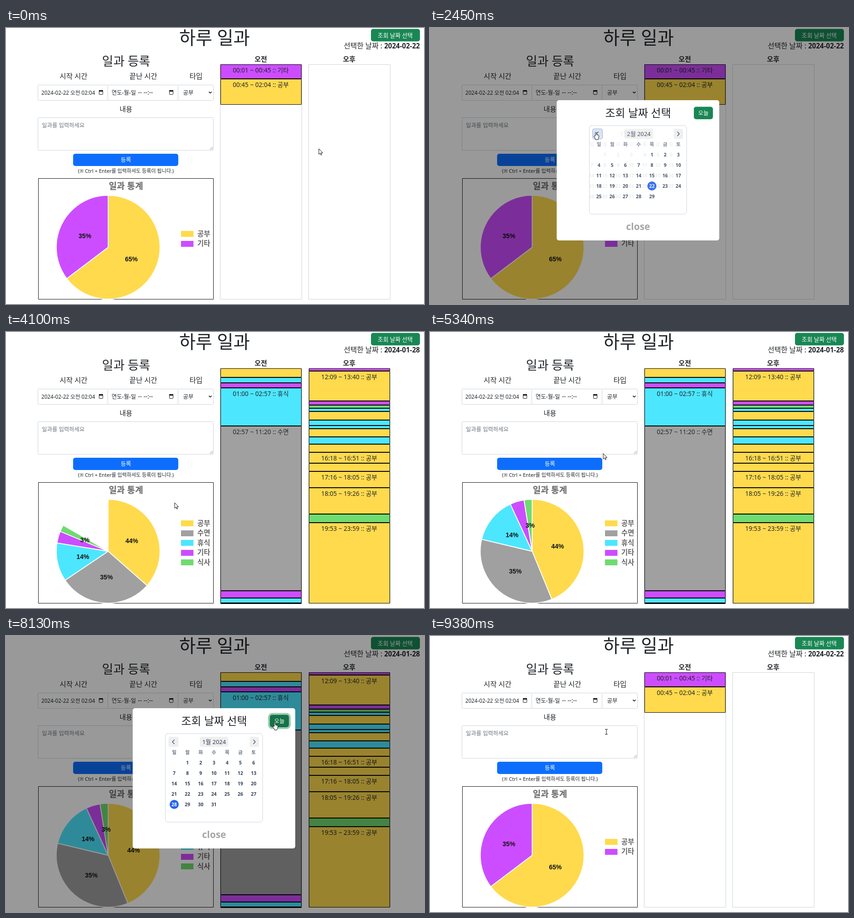
An HTML page with a canvas that plays this animation: 922x608 px, repeating every 9.45 s.

```html
<!DOCTYPE html>
<html lang="ko">
<meta charset="utf-8">
<title>하루 일과</title>
<style>
  html, body { margin: 0; width: 100%; height: 100%; overflow: hidden; background: #fff; }
  canvas { display: block; }
</style>
<canvas id="stage" width="922" height="608"></canvas>
<script>
const ctx = document.getElementById('stage').getContext('2d');
const LOOP = 9450;
const FONT = '"Noto Sans", "Noto Sans CJK KR", "Noto Sans CJK", sans-serif';
const COLOR = { 공부: '#ffda4d', 수면: '#a0a0a0', 휴식: '#4de6ff', 기타: '#cc4dff', 식사: '#70db70' };
const GREEN = '#198754', GREEN_HOVER = '#157347', LINE = '#ced4da';

// Moments of the story, in ms
const OPEN_1 = 1200, SLIDE = 2436, PICK = 3400, CLOSE_1 = 3540, LOAD_1 = 3740;
const OPEN_2 = 6735, PRESS_TODAY = 7840, CLOSE_2 = 8190, LOAD_2 = 8389;

// Pie slices: type, share, label. Blocks: bottom edge, type, time span.
const FEB = {
  pie: [['공부', .647, '65%'], ['기타', .353, '35%']],
  am: [[112, '기타', '00:01 ~ 00:45'], [169, '공부', '00:45 ~ 02:04']],
  pm: []
};
const JAN = {
  pie: [['공부', .438, '44%'], ['수면', .349, '35%'], ['휴식', .144, '14%'], ['기타', .044, ''], ['식사', .025, '3%']],
  am: [[100, '공부'], [112, '휴식'], [123, '기타'], [207, '휴식', '01:00 ~ 02:57'],
    [570, '수면', '02:57 ~ 11:20'], [586, '기타'], [597, '휴식'], [599, '수면']],
  pm: [[86, '기타'], [152, '공부', '12:09 ~ 13:40'], [161, '기타'], [168, '식사'], [175, '휴식'],
    [194, '공부'], [206, '휴식'], [213, '휴식'], [231, '공부'], [247, '휴식'], [265, '공부'],
    [289, '공부', '16:18 ~ 16:51'], [307, '공부'], [343, '공부', '17:16 ~ 18:05'],
    [401, '공부', '18:05 ~ 19:26'], [420, '식사'], [598, '공부', '19:53 ~ 23:59']]
};

// Pointer way points: time, x, y
const PATH = [
  [0, 690, 266], [900, 858, 14], [1300, 858, 14], [1960, 362, 212], [2280, 366, 230], [2500, 366, 230],
  [2850, 303, 300], [3150, 350, 375], [3260, 370, 383], [3400, 372, 376], [5060, 372, 376],
  [5340, 382, 268], [5680, 600, 135], [6020, 828, 24], [6400, 857, 16], [6650, 855, 17], [6940, 855, 17],
  [7700, 594, 192], [8200, 593, 191], [8400, 593, 191], [9310, 389, 211], [LOOP, 389, 211]
];

const ARROW = new Path2D('M0 0V12.3L2.8 9.7 4.7 14 6.5 13.2 4.7 9.1H8.6Z');
const HAND = new Path2D('M-1.3 8V1.2a1.3 1.3 0 0 1 2.6 0V5l4 1q1.6.5 1.4 2.3l-.8 4q-.2 1.3-1 2.2V16H-1v-1.5L-4.3 9.3q-.6-1.6 1-1.5z');
const IBEAM = new Path2D('M-3-5.5H-1L0-5 1-5.5H3M0-5V5M-3 5.5H-1L0 5 1 5.5H3');

const clamp = v => Math.max(0, Math.min(1, v));
const ramp = (t, start, length) => clamp((t - start) / length);
const between = (t, a, b) => t >= a && t < b;
const within = (x, y, l, t, r, b) => x >= l && x <= r && y >= t && y <= b;

// y is the visual middle of the line
function text(str, x, y, size, { color = '#212529', weight = 400, align = 'center', font = FONT } = {}) {
  ctx.font = `${weight} ${size}px ${font}`;
  ctx.fillStyle = color;
  ctx.textAlign = align;
  ctx.fillText(str, x, y + size * .37);
}

function box(l, t, r, b, { fill, stroke, radius = 0, width = 1 }) {
  ctx.beginPath();
  ctx.roundRect(l, t, r - l, b - t, radius);
  if (fill) { ctx.fillStyle = fill; ctx.fill(); }
  if (stroke) { ctx.strokeStyle = stroke; ctx.lineWidth = width; ctx.stroke(); }
}

function line(points, color, width) {
  ctx.beginPath();
  points.forEach(p => ctx.lineTo(...p));
  ctx.strokeStyle = color;
  ctx.lineWidth = width;
  ctx.stroke();
}

function dateIcon(x, y) {
  box(x - 4, y - 3.5, x + 4, y + 4.5, { stroke: '#111', radius: 1 });
  ctx.fillStyle = '#111';
  ctx.fillRect(x - 4.5, y - 5, 9, 3);
}

function form() {
  text('일과 등록', 265, 73, 27);
  text('시작 시간', 149, 106, 15.6);
  text('끝난 시간', 303, 106, 15.6);
  text('타입', 419, 106, 15.6);
  text('내용', 264.5, 178, 15.2);
  for (const [l, r] of [[70.5, 224.5], [224.5, 379.5], [379.5, 457.5]])
    box(l, 125.5, r, 159.5, { stroke: LINE, radius: 2 });
  const left = { align: 'left' };
  text('2024-02-22 오전 02:04', 78, 142.5, 11.7, left);
  text('연도-월-일', 233, 142.5, 12.4, left);
  text('-- --:--', 291, 142.5, 13.5, left);
  text('공부', 390.5, 142.5, 12.5, left);
  dateIcon(209.5, 142);
  dateIcon(364.5, 142);
  line([[447.5, 140.5], [450.5, 143.5], [453.5, 140.5]], '#111', 1.7);
  box(70.5, 197.5, 457.5, 269.5, { stroke: LINE, radius: 2 });
  text('일과를 입력하세요', 79, 214.5, 12.4, { align: 'left', color: '#6c757d' });
  line([[450, 268], [456, 262]], '#777', 1);
  line([[454, 268], [456, 266]], '#777', 1);
  box(148, 277, 380, 304, { fill: '#0d6efd', radius: 5 });
  text('등록', 264.5, 290, 12.5, { color: '#fff' });
  text('(※ Ctrl + Enter를 입력하셔도 등록이 됩니다.)', 264.5, 315, 11.1);
}

function chart(slices, grow) {
  const cx = 225.3, cy = 483, radius = 114.4;
  box(71.5, 331.5, 457.5, 597.5, { stroke: '#111' });
  text('일과 통계', 264.5, 348, 19.2, { weight: 700, color: '#666' });
  let from = -Math.PI / 2;
  const labels = [];
  slices.forEach(([type, share, label], i) => {
    const to = from + share * grow * Math.PI * 2, mid = (from + to) / 2;
    ctx.beginPath();
    ctx.moveTo(cx, cy);
    ctx.arc(cx, cy, radius, from, to);
    ctx.closePath();
    ctx.fillStyle = COLOR[type];
    ctx.fill();
    ctx.strokeStyle = '#fff';
    ctx.lineWidth = 1.8;
    ctx.lineJoin = 'bevel';
    ctx.stroke();
    labels.push([label, cx + Math.cos(mid) * radius / 2, cy + Math.sin(mid) * radius / 2]);
    from = to;
    const y = 464.5 + (i - (slices.length - 1) / 2) * 21.5, top = Math.round(y - 6.5);
    box(386, top, 413.5, top + 13, { fill: COLOR[type] });
    text(type, 422, y - .5, 15.4, { weight: 700, color: '#666', align: 'left' });
  });
  for (const [label, x, y] of labels)
    text(label, x, y, 14, { weight: 700, color: '#111', font: '"Liberation Sans", sans-serif' });
}

function column(l, title, blocks) {
  const mid = l + 88.5;
  text(title, mid, 68, 15, { weight: 700 });
  box(l - 1, 80.5, l + 179, 597.5, { stroke: LINE });
  let top = 80.5;
  for (const [bottom, type, span] of blocks) {
    box(l, top, l + 178, bottom - .5, { fill: COLOR[type], stroke: '#000' });
    if (span) text(`${span} :: ${type}`, mid, top + 12.5, 13.6);
    top = bottom + .5;
  }
}

function header(date, hover) {
  text('하루 일과', 460, 21.5, 39.6, { weight: 350 });
  box(805, 2, 913, 29.5, { fill: hover ? GREEN_HOVER : GREEN, radius: 5 });
  text('조회 날짜 선택', 858.5, 16, 12.8, { color: '#fff' });
  text(date, 913, 39, 15.1, { weight: 600, align: 'right' });
  text('선택한 날짜 :', 830, 39, 15.8, { align: 'right' });
}

function month(name, firstDay, days, selected, dx, alpha) {
  if (alpha <= 0) return;
  ctx.save();
  ctx.globalAlpha = alpha;
  ctx.translate(dx, 0);
  box(427.5, 222, 490.5, 244, { fill: '#efefef', radius: 4 });
  text(name, 459, 233.5, 12.9, { color: '#334155', weight: 500 });
  [...'일월화수목금토'].forEach((d, c) =>
    text(d, 371 + c * 29.2, 256, 10.6, { color: '#64748b', weight: 600 }));
  for (let d = 1; d <= days; d++) {
    const cell = firstDay + d - 1;
    const x = 371 + cell % 7 * 29.2, y = 279 + Math.floor(cell / 7) * 23;
    if (d === selected) box(x - 10, y - 10, x + 10, y + 10, { fill: '#2563eb', radius: 10 });
    text(d, x, y, 10.4, { weight: d === selected ? 700 : 600, color: d === selected ? '#fff' : '#334155' });
  }
  ctx.restore();
}

function modal(t, hoverPrev, hoverToday) {
  box(0, 0, 922, 608, { fill: 'rgba(0,0,0,.4)' });
  box(279.5, 159, 638, 468, { fill: '#fff', radius: 5 });
  text('조회 날짜 선택', 459, 187.5, 24);
  const ring = ramp(t, PRESS_TODAY, 150) * .5;
  if (ring) box(580, 171.5, 626, 203, { stroke: `rgba(60,153,110,${ring})`, radius: 7, width: 4 });
  box(582, 173.5, 624, 201, { fill: hoverToday ? GREEN_HOVER : GREEN, radius: 5 });
  text('오늘', 603, 187.5, 12.5, { color: '#fff' });
  text('close', 459, 437.5, 21, { weight: 700, color: '#a6a6a6' });
  box(351.5, 215, 566, 410, { fill: '#fff', stroke: '#cbd5e1', radius: 6 });

  ctx.save();
  ctx.beginPath();
  ctx.rect(352, 215, 214, 195);
  ctx.clip();
  const focus = between(t, SLIDE - 60, CLOSE_1);
  const slide = ramp(t, SLIDE, 150);
  month('2월 2024', 4, 29, 22, 16 * slide, 1 - slide);
  month('1월 2024', 1, 31, t > PICK ? 28 : 0, -16 * (1 - slide), slide);
  box(358.5, 222, 380.5, 244.5, { fill: hoverPrev ? '#dde3ee' : '#efefef', stroke: focus && '#8fb4f5', radius: 4 });
  box(537.5, 222, 558, 244.5, { fill: '#efefef', radius: 4 });
  line([[371.5, 228.5], [367, 233.2], [371.5, 238]], '#475569', 1.5);
  line([[545.5, 228.5], [550, 233.2], [545.5, 238]], '#475569', 1.5);
  ctx.restore();
}

// Smooth curve through the way points that never overshoots
function pointerAt(t) {
  const i = PATH.findIndex(p => p[0] > t);
  const [t0] = PATH[i - 1], span = PATH[i][0] - t0, k = (t - t0) / span;
  const slope = (j, axis) => j < 1 || j >= PATH.length ? 0 :
    (PATH[j][axis] - PATH[j - 1][axis]) / (PATH[j][0] - PATH[j - 1][0]);
  const speed = (j, axis) => {
    const a = slope(j, axis), b = slope(j + 1, axis);
    return a * b > 0 ? 2 * a * b / (a + b) : 0;
  };
  return [1, 2].map(axis => {
    const from = PATH[i - 1][axis], to = PATH[i][axis];
    return from + (to - from) * k * k * (3 - 2 * k) +
      span * k * (1 - k) * ((1 - k) * speed(i - 1, axis) - k * speed(i, axis));
  });
}

function pointer(x, y, hand, beam) {
  const shape = hand ? HAND : beam ? IBEAM : ARROW;
  ctx.save();
  ctx.translate(x, y);
  ctx.strokeStyle = '#111';
  ctx.lineWidth = 1;
  ctx.fillStyle = '#fff';
  if (shape !== IBEAM) ctx.fill(shape);
  ctx.stroke(shape);
  ctx.restore();
}

function draw(t) {
  const january = between(t, LOAD_1, LOAD_2);
  const data = january ? JAN : FEB;
  const age = t < LOAD_1 ? 1 : ramp(t, january ? LOAD_1 : LOAD_2, 1000);
  const open = between(t, OPEN_1, CLOSE_1) || between(t, OPEN_2, CLOSE_2);
  const [x, y] = pointerAt(t);
  const onPick = !open && within(x, y, 805, 2, 913, 29);
  const onSubmit = !open && within(x, y, 148, 277, 380, 304);
  const onText = !open && within(x, y, 71, 198, 457, 267);
  const onToday = open && within(x, y, 582, 174, 624, 201);
  const onPrev = open && within(x, y, 358, 222, 381, 245);
  const onDay = open && within(x, y, 358, 268, 560, 384);

  ctx.fillStyle = '#fff';
  ctx.fillRect(0, 0, 922, 608);
  header(between(t, CLOSE_1, CLOSE_2) ? '2024-01-28' : '2024-02-22', onPick);
  form();
  chart(data.pie, 1 - (1 - age) ** 4);
  column(473.5, '오전', data.am);
  column(668.5, '오후', data.pm);
  if (open) modal(t, onPrev, onToday);
  pointer(x, y, onPick || onSubmit || onToday || onPrev || onDay, onText);
}

function tick() {
  draw(performance.now() % LOOP);
  requestAnimationFrame(tick);
}
tick();
</script>
</html>
```
